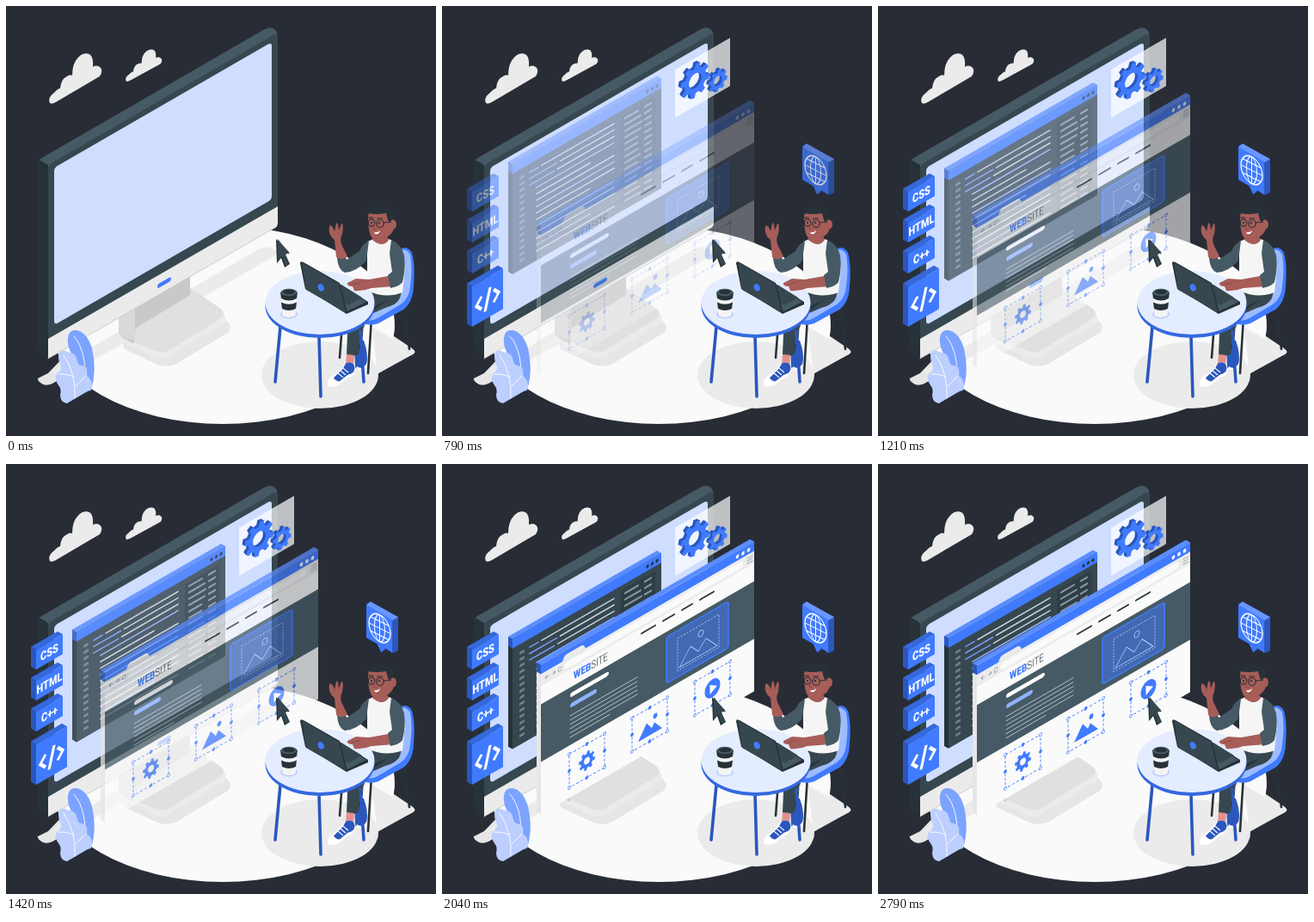
Recreate the animation shown at these times as an HTML page. Size 500 by 500 pixels, loop 2.83 s.

```html
<!DOCTYPE html>
<html lang="en">
<head>
<meta charset="utf-8">
<title>Web design workspace</title>
<style>
html, body { margin: 0; width: 100%; height: 100%; overflow: hidden; background: #282c35; }
svg { display: block; width: 100vw; height: 100vh; }
text { font-family: Roboto, "Open Sans", sans-serif; }
</style>
</head>
<body>
<svg id="stage" viewBox="0 0 500 500"></svg>
<script>
const LOOP = 2830, SLOPE = 0.577;
const BLUE = '#407bff', NAVY = '#2b57bd', SLATE = '#455a64', DARK = '#37474f', INK = '#263238', SKIN = '#a75d58';

const path = (d, fill, extra = '') => `<path d="${d}" fill="${fill}" ${extra}/>`;
const line = (d, color, width = 1, extra = '') =>
  `<path d="${d}" fill="none" stroke="${color}" stroke-width="${width}" stroke-linecap="round" stroke-linejoin="round" ${extra}/>`;
const rect = (x, y, w, h, fill, extra = '') => `<rect x="${x}" y="${y}" width="${w}" height="${h}" fill="${fill}" ${extra}/>`;
const oval = (cx, cy, rx, ry, fill, extra = '') => `<ellipse cx="${cx}" cy="${cy}" rx="${rx}" ry="${ry}" fill="${fill}" ${extra}/>`;
const group = (id, body) => `<g id="${id}">${body}</g>`;
// Isometric plane rising to the right
const plane = (x, y, body) => `<g transform="matrix(1,${-SLOPE},0,1,${x},${y})">${body}</g>`;
const label = (x, y, body, extra = '') => `<text transform="translate(${x},${y}) scale(.78,1)" ${extra}>${body}</text>`;

// Slab with a front face in the plane and depth towards the back left
function slab(x, y, w, h, d, face, side, top, body = '') {
  const k = d * SLOPE, r = w * SLOPE;
  return path(`M${x} ${y}l${-d} ${-k}v${h}l${d} ${k}z`, side) +
    path(`M${x} ${y}l${-d} ${-k}l${w} ${-r}l${d} ${k}z`, top) +
    plane(x, y, rect(0, 0, w, h, face) + body);
}

function gearPath(r, hole, teeth = 8) {
  const points = [];
  for (let i = 0; i < teeth; i++) {
    [[-.3, .75], [-.19, 1], [.19, 1], [.3, .75]].forEach(([offset, k]) => {
      const a = (i + offset) / teeth * 2 * Math.PI + .2;
      points.push(`${(Math.cos(a) * r * k * .87).toFixed(2)} ${(Math.sin(a) * r * k).toFixed(2)}`);
    });
  }
  const hx = hole * .87;
  return `M${points.join('L')}zM${hx} 0A${hx} ${hole} 0 1 0 ${-hx} 0A${hx} ${hole} 0 1 0 ${hx} 0z`;
}
const gear = (x, y, r, hole, fill) => plane(x, y, path(gearPath(r, hole), fill, 'fill-rule="evenodd"'));
const thickGear = (x, y, r, hole) =>
  [3, 2, 1].map(d => gear(x - d, y - d * SLOPE, r, hole, NAVY)).join('') + gear(x, y, r, hole, BLUE);

function random(seed) {
  return () => (seed = seed * 16807 % 2147483647) / 2147483647;
}

function floor() {
  return path('M49 427L37 433Q36 436 43 440Q48 442 54 439L100 413L70 405z', '#e6e6e6') +
    path('M400 350L472 398Q478 402 473 405L428 430z', '#ebebeb') +
    oval(252, 371, 200, 115, '#fafafa') +
    path('M49 427L132 378L293 283Q302 278 310 282L318 287L225 341L100 413L62 426z', '#ebebeb') +
    path('M425 373L473 400Q478 402 473 405L432 426z', '#ebebeb') +
    oval(365, 429, 68, 39, '#ebebeb');
}

function monitor() {
  return path('M135 389L214 340L256 366Q266 374 256 381L200 415Q187 422 174 416L138 399z', '#e6e6e6') +
    path('M131 378L214 330L248 353Q258 359 254 369L194 405Q184 413 173 408L138 392Q131 389 131 381z', '#ebebeb') +
    path('M131 376L214 328L247 350Q258 357 248 364L192 399Q184 405 174 401L138 386Q131 382 131 376z', '#e0e0e0') +
    path('M131 355L214 309V336L152 374Q147 378 149 393L136 386Q131 383 131 377z', '#c9c9c9') +
    path('M131 355L150 350V390L136 385Q131 382 131 377z', '#d9d9d9') +
    path('M37 184Q37 179 41 177L299 28Q307 23 312 27Q316 30 316 38L49 194z', SLATE) +
    path('M37 183Q37 178 41 180L49 185V409L41 405Q37 402 37 398z', INK) +
    plane(49, 185,
      rect(0, 0, 267, 215, DARK, 'rx="5"') +
      rect(7, 7, 253, 183, '#cfddff', 'rx="4"') +
      path('M0 202H267V222Q267 225 264 225H0z', '#ebebeb') +
      line('M0 225H265', '#c4c4c4', .7) +
      rect(127, 212, 16, 5, BLUE, 'rx="2.5"'));
}

function clouds() {
  const cloud = 'M51 112Q48 106 56 100Q61 95 63 95Q64 84 71 81Q75 79 77 80Q77 66 84 59Q91 52 98 56Q102 60 101 70Q106 67 110 71Q113 75 109 81L58 111Q53 114 51 112z';
  return path(cloud, '#ebebeb', 'transform="translate(0,.7)"') +
    path(cloud, '#ebebeb', 'transform="translate(104.500,15.500) scale(.69,.64)"');
}

function plant() {
  return path('M72 386Q73 376 82 377Q94 379 100 398Q106 424 99 447L80 452Q83 416 75 402Q71 394 72 386z', '#7ca3ff') +
    line('M79 384Q96 403 91 449', '#fff', .9) +
    path('M62 403Q66 398 73 403Q81 402 83 413Q84 418 88 418Q96 419 94 430Q101 434 100 445L71 462Q63 461 63 452Q65 446 61 441Q54 431 62 425Q66 421 62 414Q60 407 62 403z', '#bccfff') +
    line('M67 406Q82 428 80 456M61 428Q70 427 79 431M93 430L81 442', '#fff', .9);
}

function codeWindow() {
  const rnd = random(41);
  let body = rect(0, 0, 173, 11, BLUE) + rect(126, 17, 40, 105, INK, 'opacity=".45"');
  [157, 162.5, 168].forEach(x => body += oval(x, 6, 1.6, 2, INK));
  for (let i = 0; i < 14; i++) {
    const y = 21 + i * 7.4, split = 30 + rnd() * 22;
    body += rect(8, y - 1, 6, 3, '#71828b', 'rx="1"');
    body += i < 3
      ? line(`M20 ${y}H${split}`, '#7da2ff', 1.6) + line(`M${split + 4} ${y}H118`, '#d3dce4', 1.6)
      : line(`M28 ${y}H${i % 4 ? 118 : 90}`, i % 3 ? '#d3dce4' : '#9dbbff', 1.6);
    body += line(`M131 ${y + 1}H${143 + rnd() * 7}M154 ${y + 1}H161`, '#8796a0', 2.4);
  }
  return slab(82, 204.8, 173, 128, 5, DARK, INK, '#5a8dff', body) +
    path('M82 204.800l-5 -2.900v11l5 2.900z', NAVY);
}

function selection(x) {
  let s = rect(x, 123, 41, 39, 'none', `stroke="${BLUE}" stroke-width=".9" stroke-dasharray="3 2"`);
  for (const dx of [0, 20.5, 41]) for (const dy of [0, 19.5, 39])
    if (dx !== 20.5 || dy !== 19.5) s += oval(x + dx, 123 + dy, 1.4, 1.7, dx === 20.5 || dy === 19.5 ? BLUE : '#fff', `stroke="${BLUE}" stroke-width=".8"`);
  return s;
}

function website() {
  let body = rect(0, 0, 248, 11, BLUE) + rect(0, 11, 248, 14, '#ececec') +
    path('M25 11Q27 5 30 5H47Q50 5 52 11z', '#ececec') +
    line('M9 18H5m2 -2l-2 2l2 2M13 18h4m-2 -2l2 2l-2 2M24 17a2 2.500 0 1 0 0 2', '#9aa0a6', .8) +
    rect(27, 14, 208, 8, '#fafafa', 'rx="4"') +
    line('M240 15H246M240 18H246M240 21H246', '#9aa0a6', .9) +
    rect(0, 46, 248, 67, SLATE);
  [228.5, 235, 241.5].forEach(x => body += oval(x, 6, 1.8, 2.2, '#fff'));
  body += label(38, 39, `<tspan font-weight="800" fill="${BLUE}">WEB</tspan><tspan font-weight="300" fill="${INK}">SITE</tspan>`, 'font-size="12.500"');
  [[117, 133], [142, 155], [164, 176], [185, 201]].forEach(([a, b]) => body += line(`M${a} 31H${b}`, INK, 2));
  body += rect(34, 53, 45, 5, '#fff', 'rx="2.500"') + rect(34, 65, 31, 5, '#8fb2ff', 'rx="2.500"');
  for (let i = 0; i < 6; i++) body += line(`M34 ${79 + i * 5}H${i === 5 ? 80 : 112}`, '#cfd8dc', .7);
  body += rect(146, 52, 72, 54, '#4269b2', `rx="3" stroke="${BLUE}" stroke-width="1.600"`) +
    rect(159, 61, 48, 38, 'none', 'stroke="#b5ccff" stroke-width=".8" stroke-dasharray="2 1.500"') +
    line('M161 96L174 79L183 90L192 80L205 96z', '#b5ccff', .8) +
    oval(186, 71, 3, 3.6, 'none', 'stroke="#b5ccff" stroke-width=".8"');
  body += selection(33) + selection(106) + selection(179);
  body += `<g transform="translate(53.500,142.500)">${path(gearPath(11, 4), BLUE, 'fill-rule="evenodd"')}</g>`;
  body += path('M113 155L123 139L129 148L132 143L141 155z', BLUE) + oval(133, 136, 2.5, 3, BLUE);
  body += oval(199.5, 142.5, 9, 10.5, BLUE) + path('M196.500 137L205 142.500L196.500 148z', '#fff');
  return slab(115, 232, 248, 174, 5, '#fafafa', '#e6e6e6', '#5a8dff', body) +
    path('M115 232l-5 -2.900v11l5 2.900z', NAVY);
}

const tag = (y, name) => slab(35, y, 31, 23, 6, BLUE, NAVY, '#3568dc',
  label(15.5, 16.5, name, 'font-size="14" font-weight="800" fill="#fff" text-anchor="middle"'));

const codeTag = () => slab(35, 326, 36, 47, 6, BLUE, NAVY, '#3568dc',
  line('M11 18L5 26L11 33M21 13L15 38M25 18L31 25L25 33', '#fff', 3.4, 'style="stroke-linecap:butt;stroke-linejoin:miter"'));

const gears = () => plane(271, 74, rect(0, 0, 64, 56, '#fff', 'opacity=".7"')) +
  thickGear(294.5, 87, 19.5, 8.5) + thickGear(321, 87, 12.5, 5.5);

function globe() {
  const face = oval(0, 0, 12.5, 14.5, 'none', 'stroke="#fff" stroke-width="1.200"') +
    oval(0, 0, 6, 14.5, 'none', 'stroke="#fff" stroke-width="1"') +
    line('M0 -14V14M-12 0H12M-10 -7.500H10M-10 7.500H10', '#fff', 1);
  return path('M419 163L423 160L456 178V217L449 220L442 215L437 219L431 209L419 202z', NAVY) +
    path('M419 164L424 160L456 178L449 182z', '#6996ff') +
    path('M419 164L449 181V219L441 214L436 219L432 209L419 202z', BLUE) +
    `<g transform="matrix(1,.5,0,1.080,434.500,191)">${face}</g>`;
}

const cursor = () => path('M314 271L329 286L325 289L330 300L324 304L320 293L315 299z', INK) +
  path('M316 271L330 288L324.500 288L329 300L325 302L321 291L316 296z', DARK);

function chair() {
  return line('M391 370L388 409M425 362L421 427M463 350L469 399', INK, 2.6) +
    path('M456 284Q466 277 472 287Q476 300 474 326Q473 345 462 353L433 369Q424 373 410 368V362L450 340z', BLUE) +
    path('M455 285Q465 280 470 289Q473 305 470 326Q469 340 459 347L432 363Q424 368 410 364L408 356L448 330z', '#9dbcff');
}

function shoe(x, y, s) {
  return `<g transform="translate(${x},${y}) scale(${s})">` +
    path('M0 25Q0 19 11 13L22 1Q31 -1 33 6Q34 16 25 18L16 25Q7 32 0 28z', '#fff') +
    path('M7 19L18 8L22 1Q31 -1 32 6Q33 13 24 15L14 23Q10 23 7 19z', NAVY) +
    line('M12 13L18 18M15 10L21 15M18 7L24 12', '#fff', 1.2) + '</g>';
}

function man() {
  const legs = path('M405 388L416 389Q422 405 419 417Q413 424 406 421z', NAVY) +
    path('M408 419Q414 424 420 415V418Q414 426 407 422z', '#fff') +
    path('M458 326Q464 345 441 351L418 361L410 405Q402 409 396 405L398 358Q400 344 417 337L440 325z', DARK) +
    path('M422 352L444 342L417 361L414 392L409 400z', INK) +
    path('M396 405L405 406L404 418L395 417z', '#e58f8a') + shoe(374, 414, .98);
  const torso = path('M420 274L434 268L448 272Q461 286 464 305L461 333Q442 341 420 331z', '#f5f5f5') +
    path('M422 273Q414 277 411 285L396 295L394 288L385 293Q386 307 394 310Q408 309 419 296z', SLATE) +
    path('M384 292L382 272Q374 266 376 256Q379 253 382 262L384 253Q386 250 387 261L390 253Q393 252 391 265Q387 272 392 281L397 291Q391 297 384 292z', SKIN) +
    path('M426 261L442 265L445 272Q438 282 426 272z', SKIN);
  const head = path('M421 245Q421 237 435 236Q448 238 451 249Q453 263 444 268Q434 274 425 269Q421 263 421 245z', SKIN) +
    path('M419 247Q416 236 429 233Q450 230 452 246L448 254L444 249L442 241Q430 243 421 241z', INK) +
    oval(450, 254, 4, 5.5, SKIN) +
    `<g fill="none" stroke="${INK}" stroke-width="1.200">${oval(425, 252, 3.7, 4.2, 'none')}${oval(435, 253, 4.2, 4.5, 'none')}<path d="M439 252L448 251M421 246L427 246M431 247L438 247"/></g>` +
    oval(425, 252, 1, 1.3, INK) + oval(434, 252, 1, 1.3, INK) +
    line('M429 252L427 259L430 260', '#7c403d', .8) + path('M428 263Q432 264 435 261Q434 266 429 265z', '#fff');
  return legs + torso + head;
}

function arm() {
  return path('M450 313L422 318L407 317L397 322Q396 326 403 326L405 331Q415 332 425 328L451 326z', SKIN) +
    path('M448 272Q460 277 463 290Q465 306 461 321Q458 326 447 328L444 313L449 309L446 288z', SLATE) +
    line('M402 324L413 321', '#7c403d', .6);
}

function table() {
  const legs = line('M319 373L313 437M364 384L366 454M412 378L416 437', NAVY, 3.6);
  const top = oval(365, 349, 63.5, 37, '#3469e0') + oval(365, 345, 63.5, 37, '#e4ecff');
  const laptop = path('M349 329L386 322L421 344V347L396 358z', INK) +
    path('M352 328L384 324L419 344L395 356z', SLATE) +
    path('M375 332L390 324L414 339L398 348z', DARK) +
    path('M342 299Q342 296 346 298L388 322L397 357L348 329z', INK) +
    path('M344 298L387 323L395 356L349 330z', DARK) + oval(366.5, 327.5, 3.4, 4.4, BLUE, 'transform="rotate(-25 366 328)"');
  const cup = oval(329, 358.5, 10, 5, '#bccfff') +
    path('M319.500 338H338.500L336.500 360Q329 364 321.500 360z', '#f5f5f5') +
    path('M320 344.500Q329 349 338 344.500L337 352Q329 356 321 352z', INK) +
    path('M319 333Q329 327 339 333L338 340Q329 345 320 340z', INK) + oval(329, 333, 9.5, 4.3, SLATE) + oval(329, 332.5, 7, 2.8, INK);
  return legs + top + laptop + cup;
}

const stage = document.getElementById('stage');
stage.innerHTML = clouds() + floor() + monitor() + plant() +
  group('code', codeWindow()) + group('gears', gears()) +
  group('css', tag(216, 'CSS')) + group('html', tag(252, 'HTML')) + group('cpp', tag(288, 'C++')) +
  group('bracket', codeTag()) + group('site', website()) + group('globe', globe()) +
  cursor() + chair() + man() + table() + arm();

const ramp = (t, from, to) => Math.min(1, Math.max(0, (t - from) / (to - from)));
const swing = (t, size) => size * (1 - Math.cos((t - 2370) * 0.00125));

function show(id, opacity, dx = 0, dy = 0) {
  const el = document.getElementById(id);
  el.setAttribute('opacity', opacity.toFixed(3));
  el.setAttribute('transform', `translate(${dx.toFixed(2)},${dy.toFixed(2)})`);
}

function render(t) {
  const gearsIn = ramp(t, 40, 710);
  show('gears', gearsIn, 20 * (1 - gearsIn));
  show('bracket', ramp(t, 40, 740));
  show('globe', ramp(t, 270, 940));
  show('cpp', ramp(t, 430, 1100));
  show('html', ramp(t, 450, 1130));
  show('css', ramp(t, 460, 1150));
  show('code', ramp(t, 240, 1660), 0, -swing(t, 15));
  show('site', ramp(t, 400, 1800), 0, swing(t, 17));
}

const start = performance.now();
function tick() {
  render((performance.now() - start) % LOOP);
  requestAnimationFrame(tick);
}
render(0);
requestAnimationFrame(tick);
</script>
</body>
</html>
```
